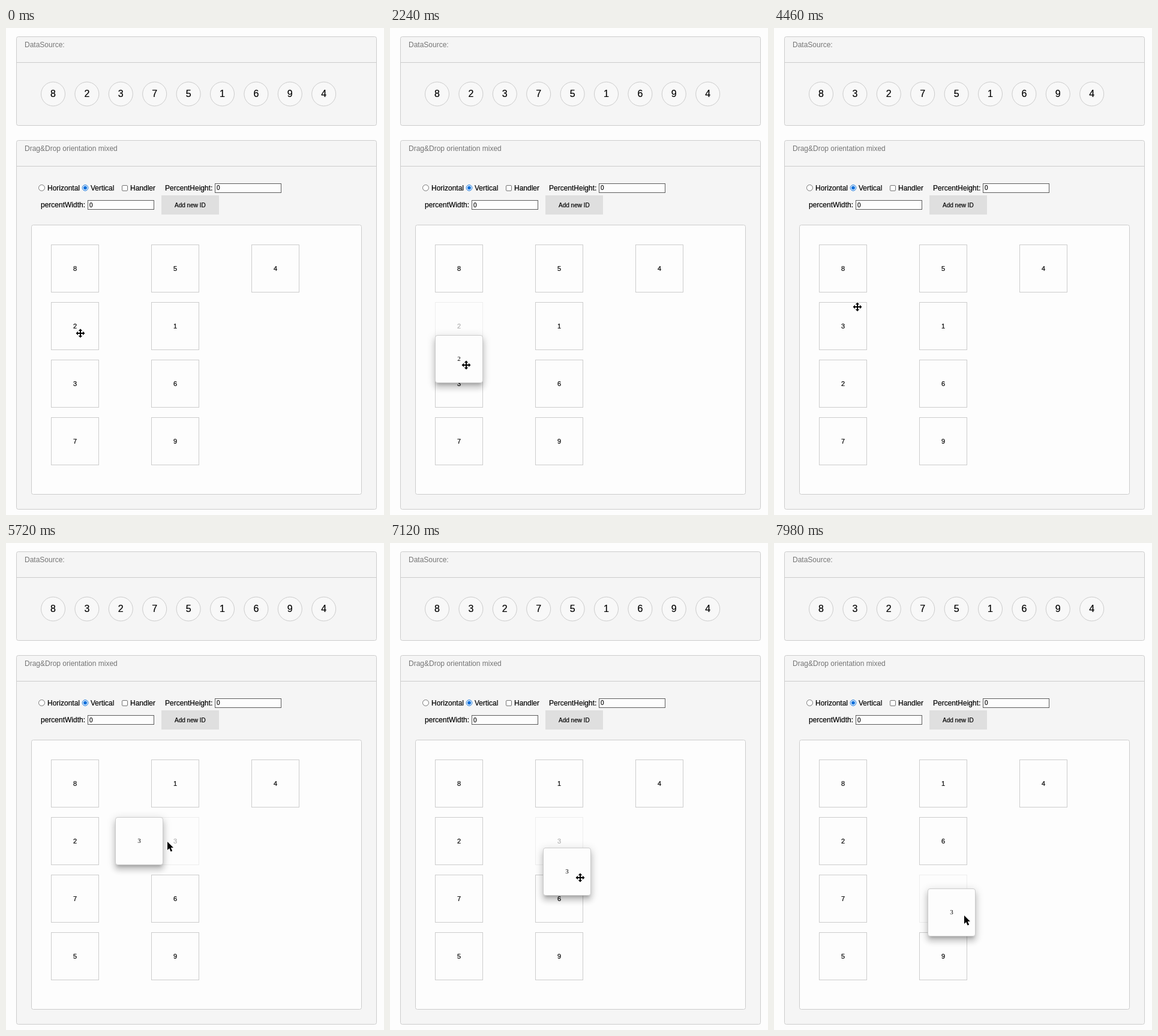
Animation of 630x812 px, one loop 8000 ms. Source, as an HTML page:

```html
<!DOCTYPE html>
<html lang="en">
<head>
<meta charset="utf-8">
<title>Drag and drop</title>
<style>
  html, body { margin: 0; width: 100%; height: 100%; overflow: hidden; background: #fdfdfd; }
  svg { position: absolute; left: 0; top: 0; }
  text { font: 12px "Liberation Sans", Arial, sans-serif; stroke: #000; stroke-width: .2px; }
  .title { fill: #757575; stroke: none; }
  .panel { fill: #f5f5f5; stroke: #ccc; }
  .list, .tile rect { fill: #fdfdfd; stroke: #ccc; }
  .field { fill: #fdfdfd; stroke: #5c5c5c; }
  .control { fill: #fff; stroke: #767676; }
  .small { font-size: 10px; }
  .source circle { fill: #f8f8f8; stroke: #ccc; }
  .source text { font-size: 16px; text-anchor: middle; }
  .tile text { font-size: 11px; text-anchor: middle; }
  .ghost { opacity: .3; }
  #preview {
    position: absolute; left: 0; top: 0; box-sizing: border-box; width: 80px; height: 80px;
    border: 1px solid #ccc; border-radius: 4px; background: #fdfdfd;
    font: 11px/77px "Liberation Serif", "Times New Roman", serif; text-align: center;
    box-shadow: 0 5px 5px -3px rgba(0,0,0,.2), 0 8px 10px 1px rgba(0,0,0,.14),
      0 3px 14px 2px rgba(0,0,0,.12);
  }
</style>
</head>
<body>
<svg width="630" height="812">
  <g class="panel">
    <rect x="17.5" y="14.5" width="600" height="148" rx="3"/>
    <path d="M17.5 57.5h600"/>
    <rect x="17.5" y="187.5" width="600" height="615" rx="3"/>
    <path d="M17.5 230.5h600"/>
  </g>
  <text class="title" x="31" y="32">DataSource:</text>
  <text class="title" x="31" y="205">Drag&amp;Drop orientation mixed</text>

  <circle class="control" cx="59.5" cy="266.5" r="5"/>
  <text x="69" y="271">Horizontal</text>
  <circle cx="132" cy="266.5" r="4.8" fill="#fff" stroke="#0b70dc"/>
  <circle cx="132" cy="266.5" r="3" fill="#0b70dc"/>
  <text x="141" y="271">Vertical</text>
  <rect class="control" x="193.5" y="262.5" width="9" height="9" rx="1.5"/>
  <text x="207" y="271">Handler</text>
  <text x="265" y="271">PercentHeight:</text>
  <rect class="field" x="348.5" y="259.5" width="110" height="15"/>
  <text class="small" x="351" y="270">0</text>
  <text x="58" y="299">percentWidth:</text>
  <rect class="field" x="136.5" y="287.5" width="110" height="15"/>
  <text class="small" x="139" y="299">0</text>
  <rect x="259" y="279" width="96" height="32" fill="#dfdfdf"/>
  <text class="small" x="281" y="299">Add new ID</text>

  <rect class="list" x="42.5" y="328.5" width="550" height="449" rx="3"/>
  <g id="source" class="source"></g>
  <g id="tiles"></g>
</svg>
<div id="preview"></div>
<svg width="630" height="812">
  <g id="cursor" stroke="#fff" stroke-width="1.6" stroke-linejoin="round" paint-order="stroke">
    <path id="arrow" d="M0 0V14L3.2 11L5.6 16.5L8.2 15.4L5.8 10H10Z"/>
    <path id="move" d="M0-7.5L3.2-4H1V-1H4V-3.2L7.5 0L4 3.2V1H1V4H3.2L0 7.5L-3.2 4H-1V1H-4V3.2L-7.5 0L-4-3.2V-1H-1V-4H-3.2Z"/>
  </g>
</svg>
<script>
const LOOP = 8000, LAG = 110, SIZE = 80, STEP = 10;
const $ = id => document.getElementById(id);

// Key points of the pointer: time, x, y
const path = [
  [0, 124, 509], [1400, 127, 490], [1550, 127, 511], [2000, 127, 525], [2780, 127, 645],
  [3000, 126, 590], [3320, 126, 587], [4460, 139, 465], [4960, 137, 498], [5200, 150, 498],
  [5720, 269, 498], [6600, 333, 502], [7010, 317, 549], [7870, 318, 617], [LOOP, 317, 622]
];
const drags = [
  { digit: '2', from: 1400, to: 3320 },
  { digit: '3', from: 4960, to: LOOP }
];
const slots = Array.from({ length: 9 }, (_, i) => ({
  x: 75 + 167 * Math.floor(i / 4), y: 361 + 96 * (i % 4)
}));

function pointerAt(t) {
  const i = Math.max(1, path.findIndex(p => p[0] >= t));
  const [t0, x0, y0] = path[i - 1], [t1, x1, y1] = path[i];
  const k = (t - t0) / (t1 - t0);
  return [Math.round(x0 + (x1 - x0) * k), Math.round(y0 + (y1 - y0) * k)];
}

// The dragged tile trails the pointer.
const trailAt = (t, drag) => pointerAt(Math.max(drag.from, t - LAG));

const slotUnder = ([x, y]) =>
  slots.findIndex(s => x >= s.x && x < s.x + SIZE && y >= s.y && y < s.y + SIZE);

// Plays the drags once: a dragged tile takes the place of each tile it reaches.
function buildStates() {
  let order = '823751694';
  const states = [{ at: 0, order, source: order }];
  for (const drag of drags) {
    const source = order;
    const home = slots[order.indexOf(drag.digit)];
    const [x, y] = pointerAt(drag.from);
    drag.grip = [x - home.x, y - home.y];
    states.push({ at: drag.from, order, source, drag });
    for (let t = drag.from; t < drag.to; t += STEP) {
      const over = slotUnder(trailAt(t, drag));
      if (over < 0 || order[over] === drag.digit) continue;
      const rest = order.replace(drag.digit, '');
      order = rest.slice(0, over) + drag.digit + rest.slice(over);
      states.push({ at: t, order, source, drag });
    }
    states.push({ at: drag.to, order, source: order });
  }
  return states;
}

$('source').innerHTML = slots.map((_, i) => {
  const x = 78.5 + 56.4 * i;
  return `<circle cx="${x}" cy="110" r="20"/><text x="${x}" y="115"></text>`;
}).join('');
$('tiles').innerHTML = slots.map(({ x, y }) =>
  `<g class="tile"><rect x="${x + .5}" y="${y + .5}" width="79" height="79"/>
   <text x="${x + 40}" y="${y + 44}"></text></g>`).join('');
const sourceTexts = [...$('source').querySelectorAll('text')];
const tiles = [...$('tiles').children];
const states = buildStates();

const show = (el, visible) => el.style.display = visible ? '' : 'none';
const moveTo = (el, x, y) => el.style.transform = `translate(${x}px, ${y}px)`;

function showState({ order, source, drag }) {
  sourceTexts.forEach((text, i) => text.textContent = source[i]);
  tiles.forEach((tile, i) => {
    tile.querySelector('text').textContent = order[i];
    tile.classList.toggle('ghost', order[i] === drag?.digit);
  });
  show($('preview'), drag);
  $('preview').textContent = drag?.digit ?? '';
}

let current;
function draw(t) {
  const state = states.findLast(s => s.at <= t);
  if (state !== current) showState(current = state);
  const { order, drag } = state;

  const pointer = pointerAt(t);
  const over = slotUnder(pointer);
  const movable = over >= 0 && order[over] !== drag?.digit;
  moveTo($('cursor'), ...pointer);
  show($('move'), movable);
  show($('arrow'), !movable);

  if (drag) {
    const [x, y] = trailAt(t, drag);
    moveTo($('preview'), x - drag.grip[0], y - drag.grip[1]);
  }
}

const start = performance.now();
function tick() {
  draw((performance.now() - start) % LOOP);
  requestAnimationFrame(tick);
}
tick();
</script>
</body>
</html>
```
